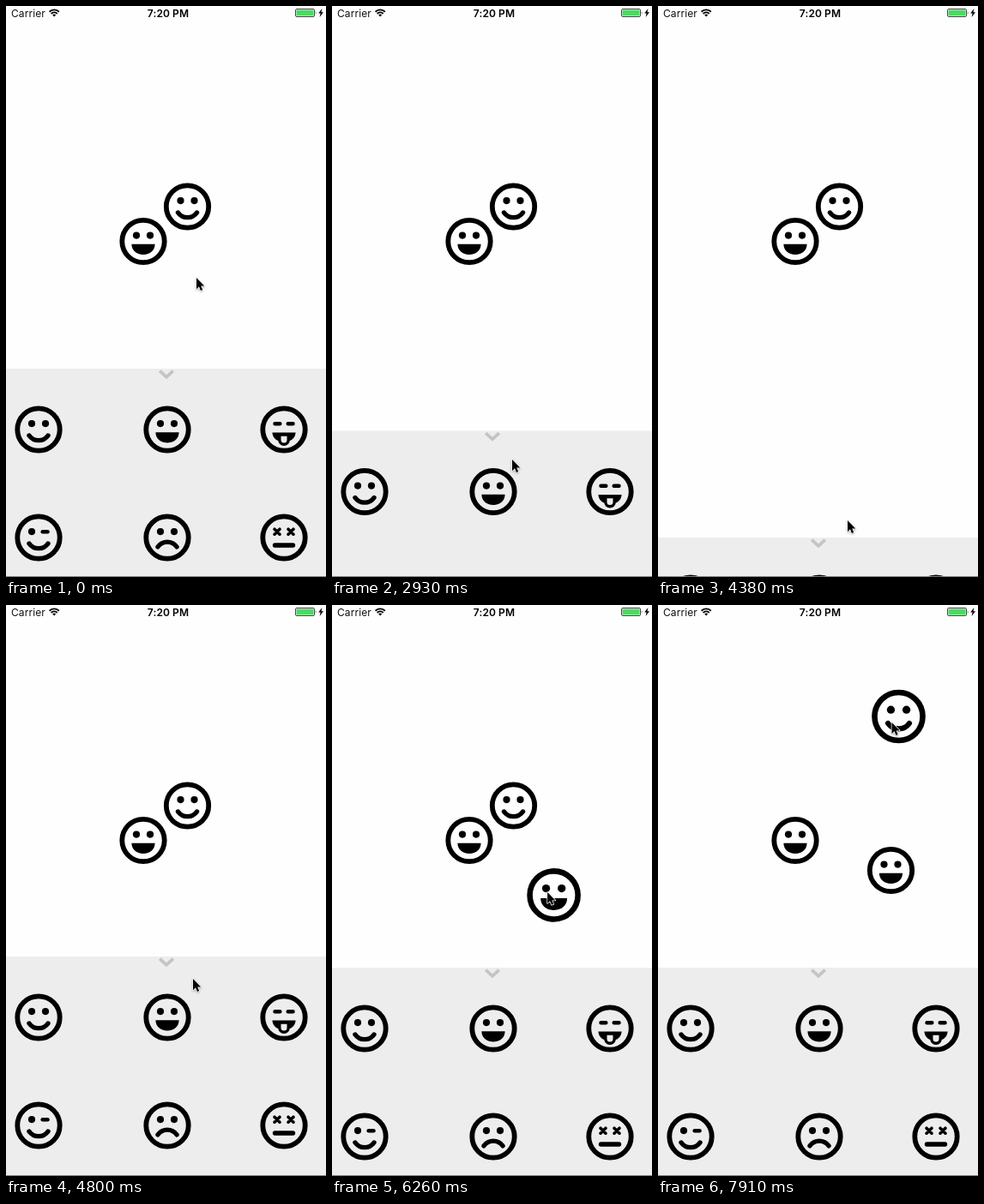
These frames come from a looping animation (373x666 px, 8000 ms). An HTML page:

```html
<!DOCTYPE html>
<html lang="en">
<head>
<meta charset="utf-8">
<title>Sticker tray</title>
<style>
  html, body { margin: 0; width: 100%; height: 100%; overflow: hidden; background: #fefefe; }
  svg { display: block; width: 100vw; height: 100vh; }
  text { font: 12px Inter, Roboto, sans-serif; letter-spacing: .1px; fill: #111; }
  .time { font-weight: 600; fill: #000; text-anchor: middle; }
  .line { fill: none; stroke: #000; stroke-width: 5.4; stroke-linecap: round; }
  .thin { stroke-width: 4.5; }
</style>
</head>
<body>
<svg viewBox="0 0 373 666">
  <defs>
    <circle id="ring" r="24.7" fill="none" stroke="#000" stroke-width="5.8"/>
    <circle id="eye" cy="-6.9" r="4.1"/>
    <g id="eyes"><use href="#eye" x="-8"/><use href="#eye" x="8"/></g>
    <path id="curve" class="line" d="M-11 7A13.5 13.5 0 0 0 11 7"/>

    <g id="smile"><use href="#ring"/><use href="#eyes"/><use href="#curve"/></g>
    <g id="grin">
      <use href="#ring"/><use href="#eyes"/>
      <path d="M-13.6 3.2H13.6C13.6 10.5 8 15.4 0 15.4S-13.6 10.5-13.6 3.2Z"/>
    </g>
    <g id="tongue">
      <use href="#ring"/>
      <path class="line thin" d="M-10.5-6.8H-4.7M4.7-6.8H10.5"/>
      <path d="M-13.6 3.4H13.6C13.2 9 9.5 12.5 5 13.5H-5C-9.5 12.5-13.2 9-13.6 3.4Z"/>
      <path d="M-6.8 8H6.8V12.2A6.8 6.8 0 0 1-6.8 12.2Z"/>
      <path d="M-3.5 7.8H3.5V12A3.5 3.5 0 0 1-3.5 12Z" fill="#ededed"/>
    </g>
    <g id="wink">
      <use href="#ring"/><use href="#eye" x="-8"/>
      <path class="line thin" d="M4.7-6.8H10.5"/><use href="#curve"/>
    </g>
    <g id="sad">
      <use href="#ring"/><use href="#eyes"/>
      <path class="line" d="M-11 10.8A13.5 13.5 0 0 1 11 10.8"/>
    </g>
    <g id="dead">
      <use href="#ring"/>
      <path class="line" style="stroke-width:3.6"
            d="M-11-9.8l6 6m0-6l-6 6M5-9.8l6 6m0-6l-6 6"/>
      <path class="line" d="M-10.5 9H10.5"/>
    </g>
  </defs>

  <rect width="373" height="666" fill="#fefefe"/>

  <text x="6" y="12.5">Carrier</text>
  <g fill="none" stroke="#000" stroke-width="1.9">
    <path d="M50.6 6.7A8 8 0 0 1 61.8 6.7M52.7 9A5 5 0 0 1 59.7 9"/>
    <path d="M54.3 10.4A2.8 2.8 0 0 1 58.1 10.4L56.2 12.5Z" fill="#000" stroke="none"/>
  </g>
  <text class="time" x="189" y="12.5">7:20 PM</text>
  <rect x="337.5" y="3.5" width="22" height="9" rx="1.5" fill="#fff" stroke="#333" stroke-width=".9"/>
  <rect x="338.5" y="4.5" width="20" height="7" rx=".6" fill="#4cd964"/>
  <path d="M360.8 6.3q1.5 1.7 0 3.4z" fill="#333"/>
  <path d="M368.4 3L364.2 8.6H366.6L365.6 13L370 7.2H367.5Z"/>

  <use href="#grin" x="160" y="274.5"/>

  <g id="tray">
    <rect width="373" height="300" fill="#ededed"/>
    <path d="M179.2 2.7L187 9.8L194.8 2.7" fill="none" stroke="#c4c4c4" stroke-width="3.8"/>
    <use href="#smile" x="38" y="71"/>
    <use href="#grin" x="188" y="71"/>
    <use href="#tongue" x="324" y="71"/>
    <use href="#wink" x="38" y="197"/>
    <use href="#sad" x="188" y="197"/>
    <use href="#dead" x="324" y="197"/>
  </g>
  <rect y="665" width="373" height="1" fill="#808080"/>

  <use id="first" href="#smile"/>
  <use id="added" href="#grin"/>

  <g id="cursor">
    <path d="M0 0V14.6L3.3 11.5L5.5 16.6L8 15.5L5.8 10.6H10.3Z" transform="scale(.9)"
          stroke="#fff" stroke-width="1.6" stroke-linejoin="round" paint-order="stroke"
          style="filter:drop-shadow(0 1px 1px #0005)"/>
  </g>
</svg>
<script>
  const LOOP = 8000, STEP = 208.2, LEAD = 7, HELD = 1.135;

  // Key points: step, then values; motion eases from one to the next.
  const pointer = [
    [0, 222, 317], [2, 160, 287], [3, 160, 287], [6, 194, 487], [8, 210, 431], [12, 210, 431],
    [14, 210, 529], [16, 213, 630], [20, 221, 645], [21, 221, 600], [23, 218, 436],
    [26, 181.5, 491], [27, 181.5, 491], [31, 264, 306], [34, 212, 238], [37, 277, 133], [38, 272.5, 137]
  ];
  const trayTop = [[12, 423], [14, 495.5], [16, 640], [20, 640], [21, 620], [23, 410], [25, 423]];

  const smooth = u => u * u * (3 - 2 * u);

  function at(keys, step) {
    const next = keys.findIndex(key => key[0] > step);
    if (next < 1) return keys.at(next && -1).slice(1);
    const [from, ...a] = keys[next - 1], [to, ...b] = keys[next];
    const u = smooth((step - from) / (to - from));
    return a.map((value, i) => value + (b[i] - value) * u);
  }

  // A face follows the pointer from grab to drop, enlarged while held.
  function carried(step, grab, drop, dx, dy) {
    const [x, y] = at(pointer, Math.min(step, drop));
    return [x + dx, y + dy, step >= grab && step <= drop ? HELD : 1];
  }

  function place(id, x, y, scale = 1) {
    document.getElementById(id).setAttribute('transform', `translate(${x} ${y}) scale(${scale})`);
  }

  function draw(time) {
    const step = Math.floor((time % LOOP + LEAD) / STEP);
    place('cursor', ...at(pointer, step));
    place('tray', 0, ...at(trayTop, step));
    place('first', ...(step < 35 ? [211.5, 234] : carried(step, 35, 38, 8, -7)));
    place('added', ...(step < 28 ? [0, 0, 0] : carried(step, 28, 31, 7.5, 3.5)));
  }

  const start = performance.now();
  function tick() {
    draw(performance.now() - start);
    requestAnimationFrame(tick);
  }
  tick();
</script>
</body>
</html>
```
